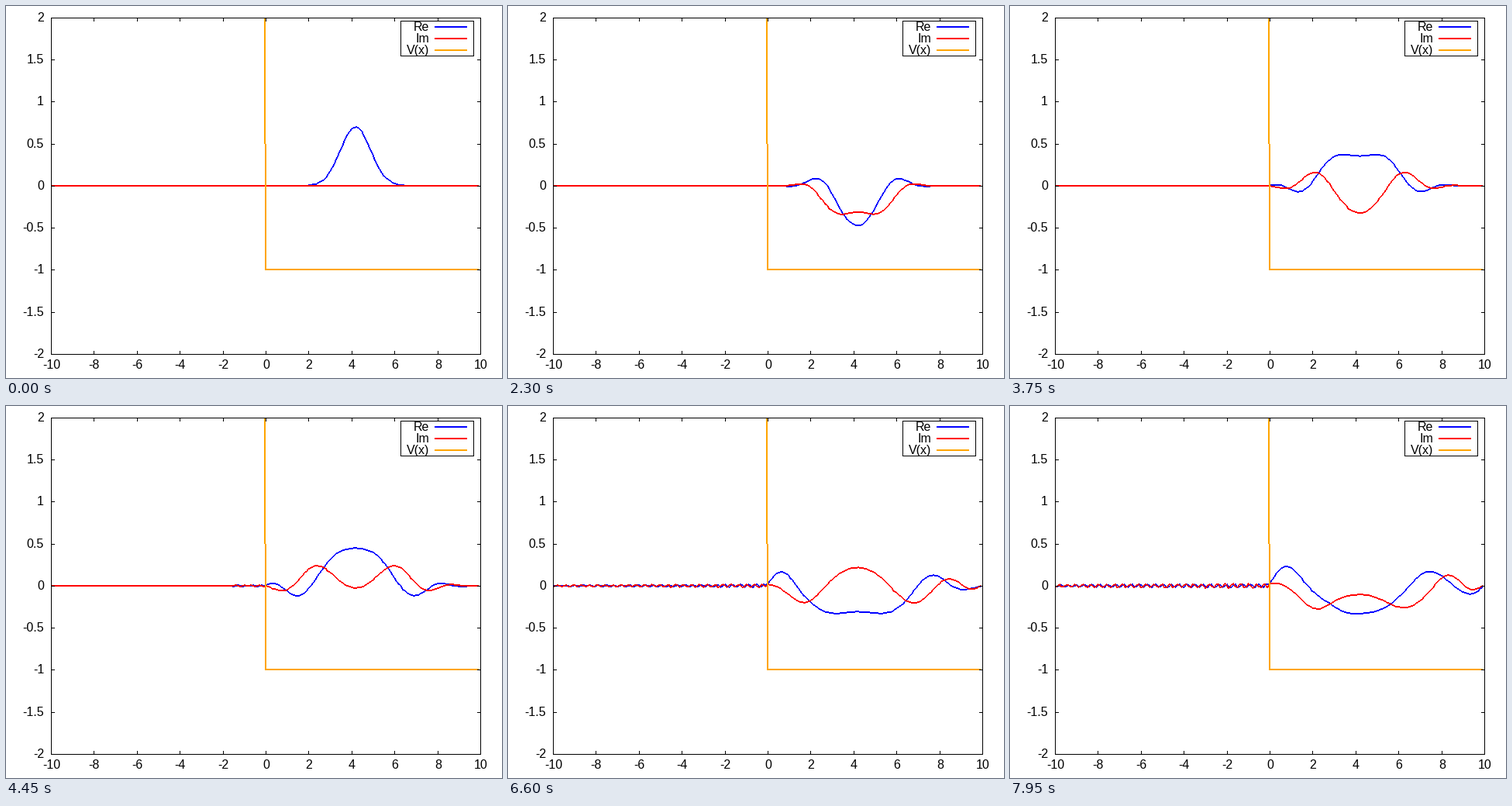
A matplotlib script that plays this animation: 640x480 px, repeating every 8000 ms.

```python
import numpy as np
import matplotlib.pyplot as plt
from matplotlib.animation import FuncAnimation

W, H = 640, 480
LEFT, RIGHT, TOP, BOTTOM = 58, 612, 15, 449
FRAMES, INTERVAL = 160, 50
BLACK, BLUE, RED, ORANGE = (0, 0, 0), (0, 0, 255), (255, 0, 0), (255, 165, 0)

# Wave packet and step potential on a periodic grid
N = 200
DT, MASS = 0.5, 40.0
X0, WIDTH2, AMP = 4.18, 0.5, 0.7
V_LEFT, V_RIGHT = 8.0, -1.0

x = -10 + 20 * np.arange(N) / N
k = 2 * np.pi * np.fft.fftfreq(N, 20 / N)
v = np.where(x < -1e-9, V_LEFT, V_RIGHT)
kick = np.exp(-0.5j * v * DT)
drift = np.exp(-0.5j * k**2 / MASS * DT)


def evolve():
    psi = AMP * np.exp(-(x - X0)**2 / (2 * WIDTH2)) + 0j
    states = [psi]
    for _ in range(FRAMES - 1):
        psi = kick * np.fft.ifft(drift * np.fft.fft(kick * psi))
        states.append(psi)
    return states


def px(value):
    up = (np.asarray(value) + 10) / 20 * (RIGHT - LEFT)
    return LEFT + np.floor(up + 0.5).astype(int)


def py(value):
    up = (np.asarray(value) + 2) / 4 * (BOTTOM - TOP)
    return BOTTOM - np.floor(up + 0.5).astype(int)


def stroke(img, xs, ys, color):
    """Hard-edged polyline, two pixels thick across its main direction."""
    for x0, y0, x1, y1 in zip(xs[:-1], ys[:-1], xs[1:], ys[1:]):
        dx, dy = x1 - x0, y1 - y0
        n = max(abs(dx), abs(dy), 1)
        t = np.arange(n + 1) / n
        cx = np.floor(x0 + dx * t + 0.5).astype(int)
        cy = np.floor(y0 + dy * t + 0.5).astype(int)
        img[cy, cx] = color
        if abs(dx) >= abs(dy):
            img[cy - 1, cx] = color
        else:
            img[cy, cx - 1] = color


def thin(img, x0, y0, x1, y1):
    img[y0:y1 + 1, x0:x1 + 1] = BLACK


def box(img, x0, y0, x1, y1):
    for y in (y0, y1):
        thin(img, x0, y, x1, y)
    for xx in (x0, x1):
        thin(img, xx, y0, xx, y1)


STATES = evolve()
XS = px(x)
X_TICKS = np.arange(-10, 11, 2)
Y_TICKS = np.arange(-2, 2.1, 0.5)
KEYS = [("Re", BLUE), ("Im", RED), ("V(x)", ORANGE)]


def draw_axes(img):
    box(img, LEFT, TOP, RIGHT, BOTTOM)
    for tx in px(X_TICKS):
        thin(img, tx, TOP, tx, TOP + 4)
        thin(img, tx, BOTTOM - 4, tx, BOTTOM)
    for ty in py(Y_TICKS):
        thin(img, LEFT, ty, LEFT + 4, ty)
        thin(img, RIGHT - 4, ty, RIGHT, ty)
    box(img, 509, 19, 603, 64)
    for row, (_, color) in enumerate(KEYS):
        y = 27 + 15 * row
        stroke(img, [553, 594], [y, y], color)


def render(i):
    img = np.full((H, W, 3), 255, np.uint8)
    psi = STATES[i]
    stroke(img, XS, py(psi.real), BLUE)
    stroke(img, XS, py(psi.imag), RED)
    zero, floor = px(0), py(-1)
    stroke(img, [zero - 1, zero, XS[-1]], [TOP, floor, floor], ORANGE)
    draw_axes(img)
    return img


fig = plt.figure(figsize=(W / 100, H / 100), dpi=100, facecolor="white")
ax = fig.add_axes([0, 0, 1, 1])
picture = ax.imshow(render(0), extent=(0, W, H, 0), aspect="auto",
                    interpolation="nearest")
ax.axis("off")


def label(xx, yy, text, align):
    ax.text(xx, yy, text, ha=align, va="baseline", color="black",
            family="Liberation Sans", size=16 * 72 / 100)


for value in X_TICKS:
    label(px(value) + 0.5, 468, f"{value}", "center")
for value in Y_TICKS:
    label(49, py(value) + 5, f"{value:g}", "right")
for row, (name, _) in enumerate(KEYS):
    label(546, 32 + 15 * row, name, "right")


def update(i):
    picture.set_data(render(i))
    return picture,


anim = FuncAnimation(fig, update, frames=FRAMES, interval=INTERVAL,
                     init_func=lambda: update(0), repeat=True,
                     repeat_delay=0, blit=False)
plt.show()
```
